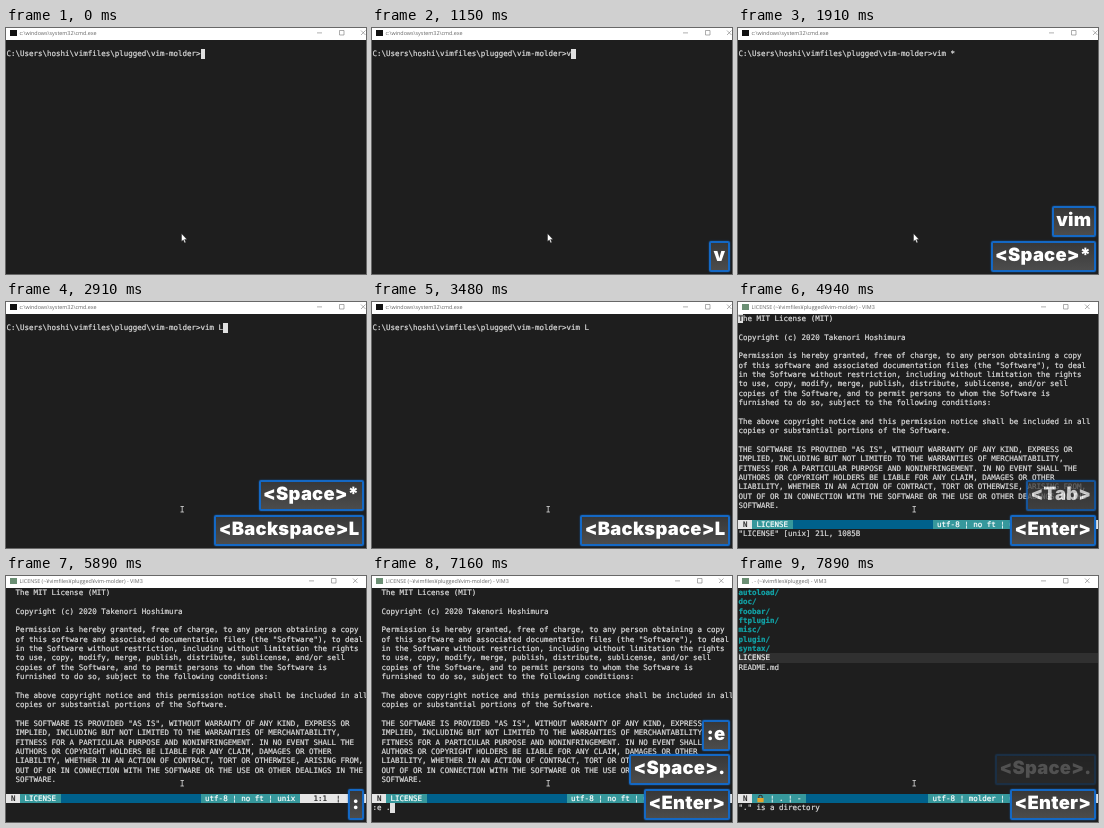
An HTML page for the animation above (8000 ms loop, 360 by 246 pixels).

```html
<!DOCTYPE html>
<html lang="en">
<head>
<meta charset="utf-8">
<title>Terminal session</title>
<style>
  html, body { margin: 0; width: 100%; height: 100%; overflow: hidden; background: #1e1e1e; }
  body { position: relative; text-rendering: geometricPrecision; }
  #bar { position: absolute; inset: 0 0 auto; height: 11.5px; background: #fff; color: #666;
         font: 5.4px/10px "Open Sans", sans-serif; white-space: pre; }
  #title { position: absolute; left: 13.5px; top: 0; }
  #icon { position: absolute; left: 4px; top: 2px; width: 7px; height: 6px; background: #111; }
  #bar svg { position: absolute; right: 0; top: 0; }
  #bar.vim #icon { background: #6b8f74; }
  #bar.vim svg { right: 8px; }
  #screen { position: absolute; left: 0; top: 11.8px; width: 362px; margin: 0; color: #dcdcdc;
            font: 7.5px/9.37px "DejaVu Sans Mono", monospace; -webkit-text-stroke: .2px; }
  #screen div { height: 9.37px; padding-left: .4px; white-space: pre; }
  #screen span { display: inline-block; height: 9.37px; vertical-align: top; }
  #screen svg { vertical-align: top; }
  .line { background: #303030; color: #f4f4f4; }
  .dir { color: #12a5a9; font-weight: bold; }
  .status { background: #00618c; }
  .mode { background: #e6e6e6; color: #222; }
  .part { background: #36989c; color: #fff; }
  #screen #cursor { position: absolute; width: 4.5px; padding: 0; background: #e0e0e0; color: #1c1c1c; }
  #pointer { position: absolute; left: 0; top: 0; }
  #keys { position: absolute; right: 2.2px; bottom: 2.2px; display: flex; flex-direction: column;
          align-items: flex-end; gap: 3.8px; }
  #keys div { box-sizing: border-box; height: 30.8px; padding: 0 2.5px; border: 2.5px solid #1468c4;
              border-radius: 2px; background: linear-gradient(#383838, #4c4c4c); color: #fff;
              box-shadow: 0 0 1.5px #1468c4; letter-spacing: .25px;
              font: 900 18.4px/25px Inter, sans-serif; white-space: pre; }
</style>
</head>
<body>
<div id="bar">
  <i id="icon"></i><span id="title"></span>
  <svg width="60" height="11" fill="none" stroke="#777" stroke-width=".6">
    <path d="M11 4.9h5M33.5 2.5h4.5v4.5h-4.5zM55 2.5l4.5 4.5m0-4.5l-4.5 4.5"/>
  </svg>
</div>
<div id="screen"></div>
<svg id="pointer" width="360" height="246">
  <path id="arrow" d="M175.5 205.5v8l1.8-1.6 1.3 3 1.3-.6-1.3-2.8h2.4z" fill="#fff" stroke="#111" stroke-width=".4"/>
  <path id="beam" d="M174.5 204.5h3.4M176.2 204.5v5.5M174.5 210h3.4" fill="none" stroke="#ddd" stroke-width=".8"/>
</svg>
<div id="keys"></div>
<script>
const LOOP = 8000, HOLD = 1070, FADE = 350;
const $ = id => document.getElementById(id);

const prompt = 'C:\\Users\\hoshi\\vimfiles\\plugged\\vim-molder>';
const license = `The MIT License (MIT)

Copyright (c) 2020 Takenori Hoshimura

Permission is hereby granted, free of charge, to any person obtaining a copy
of this software and associated documentation files (the "Software"), to deal
in the Software without restriction, including without limitation the rights
to use, copy, modify, merge, publish, distribute, sublicense, and/or sell
copies of the Software, and to permit persons to whom the Software is
furnished to do so, subject to the following conditions:

The above copyright notice and this permission notice shall be included in all
copies or substantial portions of the Software.

THE SOFTWARE IS PROVIDED "AS IS", WITHOUT WARRANTY OF ANY KIND, EXPRESS OR
IMPLIED, INCLUDING BUT NOT LIMITED TO THE WARRANTIES OF MERCHANTABILITY,
FITNESS FOR A PARTICULAR PURPOSE AND NONINFRINGEMENT. IN NO EVENT SHALL THE
AUTHORS OR COPYRIGHT HOLDERS BE LIABLE FOR ANY CLAIM, DAMAGES OR OTHER
LIABILITY, WHETHER IN AN ACTION OF CONTRACT, TORT OR OTHERWISE, ARISING FROM,
OUT OF OR IN CONNECTION WITH THE SOFTWARE OR THE USE OR OTHER DEALINGS IN THE
SOFTWARE.`.split('\n');
const withSignColumn = license.map(line => '  ' + line);

const span = (cls, text) => `<span class="${cls}">${text}</span>`;
const folders = ['autoload', 'doc', 'foobar', 'ftplugin', 'misc', 'plugin', 'syntax'];
const listing = [...folders.map(name => span('dir', name + '/')), 'LICENSE', 'README.md'];
const lock = '<svg width="9.03" height="9"><path d="M2.8 4.5V3a1.7 1.7 0 0 1 3.4 0v1.5" fill="none" ' +
  'stroke="#333" stroke-width="1.1"/><path d="M1.4 4h6.2v4.3H1.4z" fill="#e5a52c"/></svg>';

// Each side of the status line fills part of the 80 columns.
function status(name, nameCols, type, position) {
  const info = ` utf-8 ¦ ${type} ¦ unix `;
  const gap = ' '.repeat(80 - 3 - nameCols - info.length - position.length);
  return span('mode', ' N ') + span('part', name) + gap + span('part', info) + span('mode', position);
}
const fileStatus = status(' LICENSE ', 9, 'no ft', '   1:1  ¦   4% ');
const dirStatus = status(` ${lock} ¦ . ¦ - `, 12, 'molder', '   8:1  ¦  88% ');

const shell = (text, on = true) =>
  ({ lines: ['', prompt + text], cursor: on && [prompt.length + text.length, 1] });
const editor = (lines, bar, message) =>
  ({ lines: [...lines, ...Array(22 - lines.length).fill(''), bar, message] });
const command = text =>
  ({ ...editor(withSignColumn, fileStatus, text), cursor: text && [text.length, 23] });

const cmd = 'c:\\windows\\system32\\cmd.exe';
const fileInfo = '"LICENSE" [unix] 21L, 1085B';
const steps = [
  [0, { title: cmd, app: 'cmd', beam: false, ...shell('') }],
  [430, { cursor: null }],
  [860, shell('')],
  [1150, shell('v')],
  [1300, shell('vi')],
  [1450, shell('vim')],
  [1600, shell('vim ')],
  [1910, shell('vim *', false)],
  [2060, { ...shell('vim *'), beam: true }],
  [2490, { cursor: null }],
  [2620, shell('vim ')],
  [2910, shell('vim L')],
  [3330, { cursor: null }],
  [3780, shell('vim LICENSE')],
  [3910, { cursor: [0, 2] }],
  [4330, { title: cmd + ' - vim  LICENSE' }],
  [4560, { lines: [], cursor: [0, 0] }],
  [4940, { title: 'LICENSE (~¥vimfiles¥plugged¥vim-molder) - VIM3', app: 'vim',
           ...editor(license, fileStatus, fileInfo), cursor: [0, 0, 'T'] }],
  [5080, { ...editor(withSignColumn, fileStatus, fileInfo), cursor: [2, 0, 'T'] }],
  [5370, { cursor: null }],
  [5890, command('')],
  [6020, command(':')],
  [6150, command(':e')],
  [6400, command(':e ')],
  [6550, command(':e .')],
  [7290, { title: '. - (~¥vimfiles¥plugged) - VIM3',
           ...editor(listing, dirStatus, '"." is a directory'), marked: 7, cursor: [0, 7, 'L'] }],
  [7720, { cursor: null }],
];

// One entry per key box: the strokes it collects, with their times.
const boxes = [
  [[1150, 'v'], [1300, 'i'], [1450, 'm']],
  [[1600, '<Space>'], [1910, '*']],
  [[2620, '<Backspace>'], [2910, 'L']],
  [[3780, '<Tab>']],
  [[3910, '<Enter>']],
  [[5890, ':'], [6150, 'e']],
  [[6400, '<Space>'], [6550, '.']],
  [[7160, '<Enter>']],
].map(strokes => ({ strokes, el: $('keys').appendChild(document.createElement('div')) }));

function drawScreen({ title, app, beam, lines, marked, cursor }) {
  $('title').textContent = title;
  $('bar').className = app;
  $('arrow').style.display = beam ? 'none' : '';
  $('beam').style.display = beam ? '' : 'none';
  const rowClass = row => row === 22 ? 'status' : row === marked ? 'line' : '';
  let html = lines.map((line, row) => `<div class="${rowClass(row)}">${line}</div>`).join('');
  if (cursor) {
    const [col, row, char = ''] = cursor;
    html += `<div id="cursor" style="left:${0.4 + col * 4.515}px;top:${row * 9.37}px">${char}</div>`;
  }
  $('screen').innerHTML = html;
}

function drawKeys(t) {
  for (const { strokes, el } of boxes) {
    const pressed = strokes.filter(([time]) => time <= t);
    const age = pressed.length ? t - pressed.at(-1)[0] : Infinity;
    const opacity = Math.min(1, 1 - (age - HOLD) / FADE);
    el.style.display = opacity > 0 ? '' : 'none';
    el.style.opacity = Math.max(0, opacity);
    el.textContent = pressed.map(([, text]) => text).join('');
  }
}

let shown = 0;
function tick() {
  const t = performance.now() % LOOP;
  const current = steps.filter(([time]) => time <= t);
  if (current.length !== shown) {
    shown = current.length;
    drawScreen(Object.assign({}, ...current.map(([, change]) => change)));
  }
  drawKeys(t);
  requestAnimationFrame(tick);
}
tick();
</script>
</body>
</html>
```
